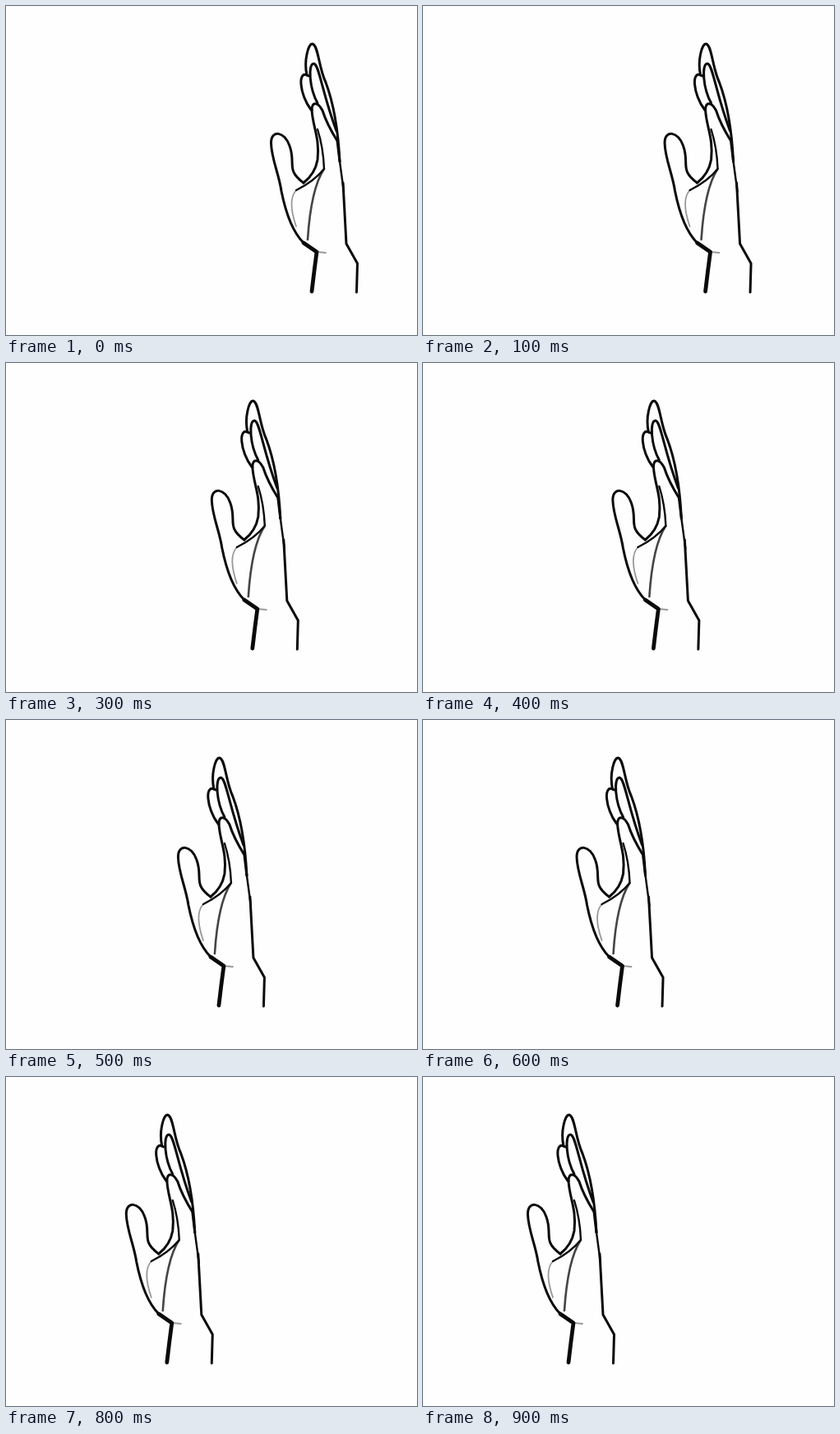
Write an HTML page that moves like this. It is 500 px wide and 400 px high and loops after 1000 ms.

```html
<!DOCTYPE html>
<html lang="en">
<head>
<meta charset="utf-8">
<title>Hand sliding left</title>
<style>
  html, body { margin: 0; width: 100%; height: 100%; overflow: hidden; background: #fefefe; }
  svg { display: block; width: 100vw; height: 100vh; }
  path { fill: none; stroke: #0a0a0a; stroke-width: 3; stroke-linecap: round; stroke-linejoin: round; }
  .fine { stroke-width: 2.4; }
  .bold { stroke-width: 4.8; }
  .crease { stroke: #444; stroke-width: 2.6; }
  .faint { stroke: #999; stroke-width: 1.8; }
</style>
</head>
<body>
<svg viewBox="0 0 500 400">
  <g id="hand">
    <!-- palm shading -->
    <path class="faint" d="M353 224Q342 236 353 268M378 299L389 300"/>
    <path class="crease" d="M387 198Q371 222 367 284"/>
    <!-- outer finger, its neighbours, front finger -->
    <path d="M366 84C362 66 368 46 372.500 46C380 47 380 74 389 93Q403 130 406 189"/>
    <path d="M379 118C369 100 367 70 374.500 70C381 71 384 104 402 152"/>
    <path d="M368 85C354 76 357 108 371 126"/>
    <path d="M372 127C372 116 379 116 385 127Q390 143 403 164L406 189"/>
    <!-- thumb side of the palm -->
    <path d="M372 126C373 147 382 160 379 187Q376 204 362 215"/>
    <path class="fine" d="M379 150Q386 172 387 198Q375 213 353 224"/>
    <path d="M362 215C340 199 353 192 345 170C339 152 322 150 322.500 167C323 186 332 204 335 225Q344 270 362 288"/>
    <!-- wrist and outer edge -->
    <path class="bold" d="M362 288L378 299L375 322L372 347"/>
    <path class="fine" d="M406 189L411 226"/>
    <path d="M410 215L414 289L427.500 313L426.500 348"/>
  </g>
</svg>
<script>
const hand = document.getElementById('hand');
const LOOP = 1000, STEPS = 10, TRAVEL = 195;

// Steady slide with a quick start and a slight sway.
function shift(step) {
  const u = step / (STEPS - 1);
  const wave = k => Math.sin(k * Math.PI * u);
  return TRAVEL * u + 7.3 * wave(1) + 1.8 * wave(2) + 2.7 * wave(3) + 0.8 * wave(4);
}

function render(ms) {
  const step = Math.floor((ms % LOOP) / LOOP * STEPS);
  hand.setAttribute('transform', `translate(${-shift(step)} 0)`);
}

const start = performance.now();
function tick() {
  render(performance.now() - start);
  requestAnimationFrame(tick);
}
tick();
</script>
</body>
</html>
```
